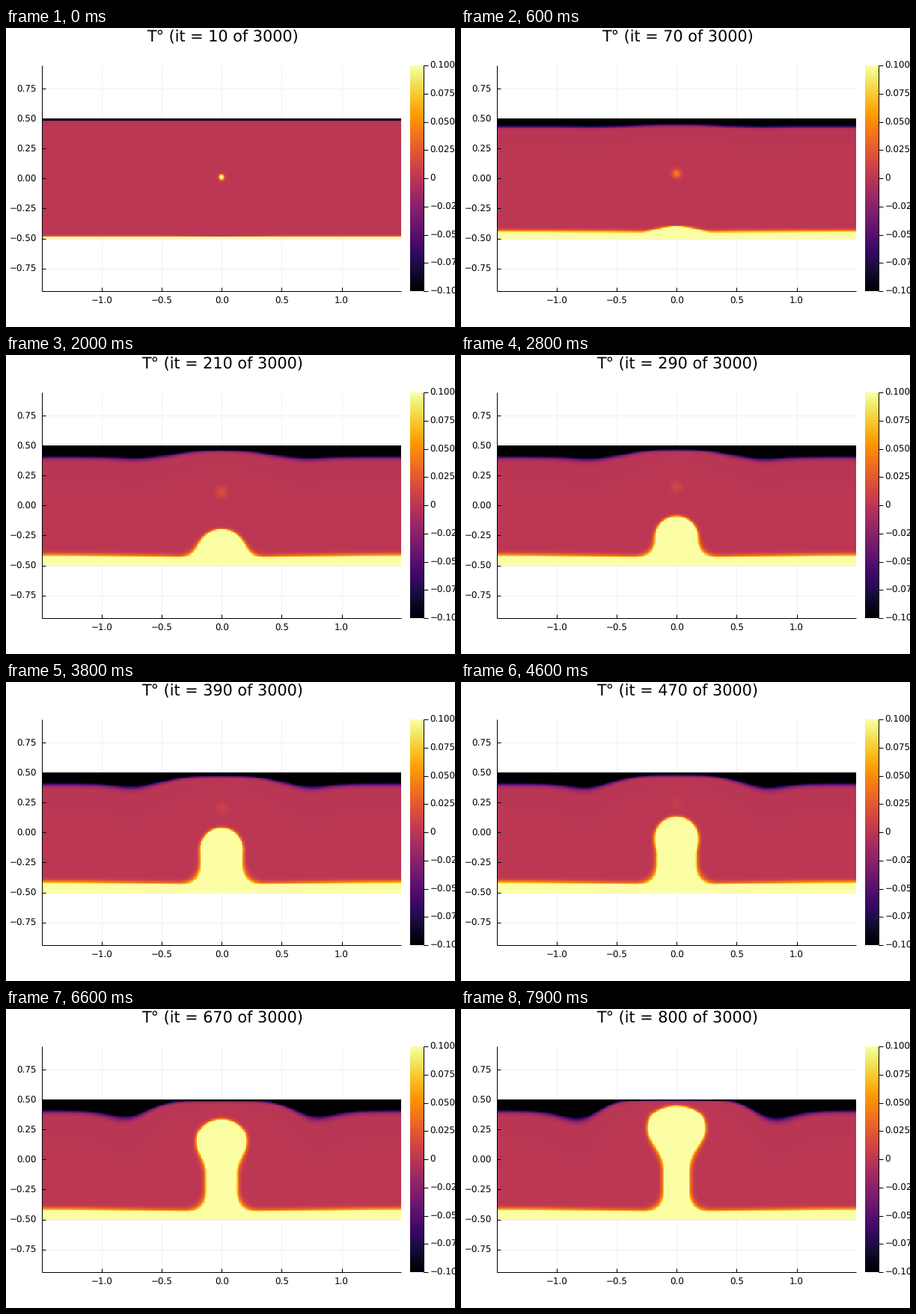
A matplotlib script that plays this animation: 600 by 400 pixels, repeating every 8 s.

```python
import numpy as np
import matplotlib.pyplot as plt
from matplotlib.animation import FuncAnimation

W, H, DPI = 600, 400, 100
FRAMES, STEP, TOTAL = 80, 10, 3000
X0, Y0, UNIT = 288.3, 201.4, 160.3          # data origin and scale in pixels
LEFT, RIGHT, TOP, BOTTOM = 48, 528, 50, 352
HEAT_TOP, HEAT_BOTTOM = 121, 282
NX, NY = 288, 96
ONSET = 130                                 # iteration when the wall layers stop growing

plt.rcParams.update({"font.family": "DejaVu Sans", "text.hinting": "none"})

# Cell centres of the right half; the left half is its mirror image
cell_x = (np.arange(NX // 2) + 0.5) * (RIGHT - LEFT) / NX
cell_y = HEAT_TOP + (np.arange(NY) + 0.5) * (HEAT_BOTTOM - HEAT_TOP) / NY
GX, GY = np.meshgrid(cell_x, cell_y)


def smooth_min(a, b, k):
    h = np.maximum(k - np.abs(a - b), 0) / k
    return np.minimum(a, b) - h * h * k / 4


def ellipse(x, y, rx, ry):
    """Approximate signed distance to an ellipse."""
    q = np.hypot(x / rx, y / ry)
    return q * (q - 1) / (np.hypot(x / rx ** 2, y / ry ** 2) + 1e-9)


def falloff(dist, width):
    s = np.maximum(dist + 0.6, 0) / width
    return 0.1 * np.exp(-s - s * s / 4)


def growth(it):
    """Progress to onset, wall layer thickness (0..1) and time since onset."""
    r = min(it / ONSET, 1)
    return r, 1.064 * np.sqrt(r) - 0.064, max(it - ONSET, 0)


def hot_layer(it):
    """Plume: a rising head on a thinning stem, blended into the floor."""
    r, thick, s = growth(it)
    u = s / 670
    age = it - ONSET
    tip = 252 - 0.24 * age + 8.64e-5 * age ** 2
    rx = 27.5 + 10 * u ** 3 + 14 * np.exp(-s / 60)
    ry = 29
    neck = min(rx - 0.5, 35 - 0.027 * s)
    head = ellipse(GX, GY - tip - ry, rx, ry)
    stem = np.maximum(GX - neck, tip + ry - GY)
    plume = smooth_min(head, stem, 1.5 * (rx - neck))
    sag = r * r * 1.25 * (1 + np.cos(np.pi * GX / 240))
    floor = HEAT_BOTTOM - 13.4 * thick + sag - GY
    dist = smooth_min(plume, floor, 28 * r)
    spread = np.clip(np.maximum((GY - tip) / 60, GX / 80), 0, 1)
    return falloff(dist, (2 + 1.6 * spread) * r ** 0.35)


def cold_layer(it):
    """Lid: lifted in the middle, with a sinking trough on either side."""
    r, thick, s = growth(it)
    u = s / 670
    lift = (7.7 + 5.8 * u) / (1 + np.exp((cell_x - 52 - 42 * u) / (14 - 3 * u)))
    skew = np.log(cell_x / (112 + 20 * u)) / 0.17
    trough = (1.5 + 9 * u ** 1.2) * np.exp(-skew ** 2 / 2)
    edge = HEAT_TOP + 14.5 * thick + r * r * (trough - lift)
    width = (1.3 + 0.16 * np.maximum(edge - HEAT_TOP, 0)) * r ** 0.35
    return falloff(GY - edge, width)


def blob(it):
    """Small warm spot that drifts up while it spreads and fades."""
    r, _, s = growth(it)
    var = 3 + 28 * r
    amp = 0.8 / var * np.exp(-s / 250)
    return amp * np.exp(-(GX ** 2 + (GY - 200.6 + 0.082 * it) ** 2) / (2 * var))


def temperature(it):
    half = np.maximum(hot_layer(it), blob(it)) - cold_layer(it)
    return np.hstack([half[:, ::-1], half])


fig = plt.figure(figsize=(W / DPI, H / DPI), dpi=DPI, facecolor="white")
ax = fig.add_axes([0, 0, 1, 1])
ax.axis("off")


def line(x1, y1, x2, y2, color="black", z=3):
    ax.plot([x1, x2], [y1, y2], color=color, lw=0.72, zorder=z,
            solid_capstyle="butt")


def label(x, y, text, ha, px=11.9):
    return ax.text(x, y, text.replace("-", "\u2212"), ha=ha, va="baseline",
                   fontsize=px * 72 / DPI, color="black")


for v in np.arange(-1, 1.1, 0.5):
    x = X0 + v * UNIT
    line(x, TOP, x, BOTTOM, "#f0f0f0", 0)
    line(x, BOTTOM - 5, x, BOTTOM)
    label(x, 368.5, f"{v:.1f}", "center")
for v in np.arange(-0.75, 0.8, 0.25):
    y = Y0 - v * UNIT
    line(LEFT, y, RIGHT, y, "#f0f0f0", 0)
    line(LEFT, y, LEFT + 5, y)
    label(41, y + 4.3, f"{v:.2f}", "right")
line(LEFT, TOP, LEFT, BOTTOM)
line(LEFT, BOTTOM, RIGHT, BOTTOM)

# Colour bar, its labels run off the right edge
look = dict(cmap="inferno", vmin=-0.1, vmax=0.1, aspect="auto",
            interpolation="nearest", zorder=1)
ax.imshow(np.linspace(0.1, -0.1, 256)[:, None],
          extent=(540, 558, BOTTOM, TOP), **look)
line(558, TOP, 558, BOTTOM)
for n in range(-4, 5):
    y = (TOP + BOTTOM) / 2 - n * (BOTTOM - TOP) / 8
    line(558, y, 564, y)
    label(566.7, y + 4, f"{n * 0.025:.3f}" if n else "0", "left")

heat = ax.imshow(temperature(STEP),
                 extent=(LEFT, RIGHT, HEAT_BOTTOM, HEAT_TOP), **look)
title = label(289, 18.6, "", "center", 20.8)
ax.set_xlim(0, W)
ax.set_ylim(H, 0)


def update(frame):
    it = STEP * (frame + 1)
    heat.set_data(temperature(it))
    title.set_text(f"T° (it = {it} of {TOTAL})")
    return heat, title


anim = FuncAnimation(fig, update, frames=FRAMES, interval=100, repeat=True)
plt.show()
```
